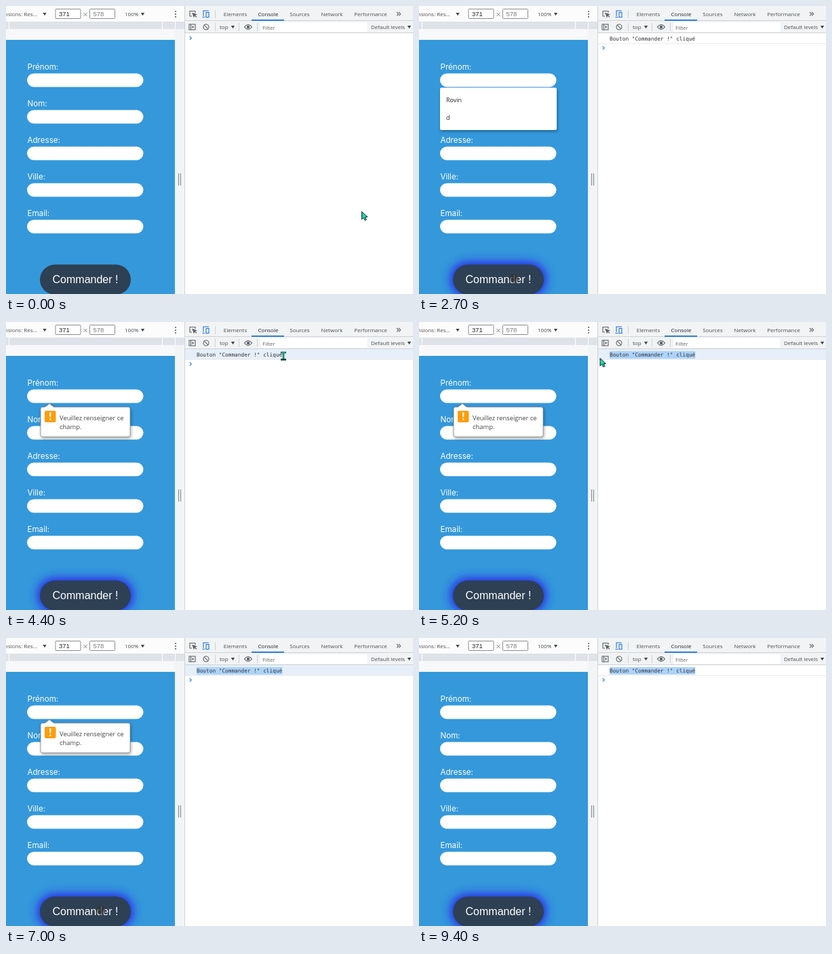
An HTML page that plays this animation: 600 px wide and 425 px high, repeating every 9.5 s.

```html
<!DOCTYPE html>
<html lang="fr">
<head>
<meta charset="utf-8">
<title>Formulaire et console</title>
<style>
html, body { margin: 0; width: 100%; height: 100%; overflow: hidden; background: #fff; }
svg { display: block; width: 600px; height: 425px; }
text { font: 8px "Open Sans", "Noto Sans", sans-serif; fill: #4a4d51; white-space: pre; }
.label text { font: 11.6px Inter, sans-serif; fill: #fff; }
.size { font: 9.5px "Liberation Sans", Arial, sans-serif; fill: #222; }
.order { font: 16px "Liberation Sans", Arial, sans-serif; fill: #fff; }
.log { font: 7.77px "DejaVu Sans Mono", monospace; fill: #303236; }
.items text { font-size: 9px; fill: #222; }
.tip text { font-size: 9.4px; fill: #444; }
.mid { text-anchor: middle; }
.icon { fill: none; stroke: #5f6368; stroke-width: 1.1; }
.shade { filter: drop-shadow(1px 2px 2px rgba(0, 0, 0, .35)); }

.anim { animation: 9.5s step-end infinite; }
#glow { animation-name: glow; }
#items { animation-name: items; }
#tip { animation-name: tip; }
#log { animation-name: log; }
#prompt { animation-name: prompt; }
#row { animation-name: row; }
#marked { animation-name: marked; transform-box: fill-box; transform-origin: right; }
#pointer { animation-name: move; }
#arrow { animation-name: arrow; }
#beam { animation-name: beam; }
#touch { animation-name: touch; }

@keyframes glow {
  0% { opacity: 0; }
  20% { opacity: 0; animation-timing-function: steps(4); }
  24.21%, 100% { opacity: 1; }
}
@keyframes items { 0%, 45.26%, 100% { opacity: 0; } 21.05% { opacity: 1; } }
@keyframes tip {
  0%, 76.84%, 100% { opacity: 0; }
  21.05% { opacity: 1; }
  73.68% { opacity: 1; animation-timing-function: steps(3); }
}
@keyframes log { 0% { opacity: 0; } 21.05%, 100% { opacity: 1; } }
@keyframes prompt { 0% { transform: none; } 21.05%, 100% { transform: translateY(14.5px); } }
@keyframes row { 0%, 98.94%, 100% { opacity: 0; } 45.26% { opacity: 1; } }
@keyframes marked {
  0% { transform: scaleX(0); }
  46.31% { transform: scaleX(0); animation-timing-function: steps(6); }
  52.63%, 100% { transform: scaleX(1); }
}
@keyframes arrow {
  0%, 32.63%, 53.68% { opacity: 1; }
  8.42%, 34.73%, 61.05%, 100% { opacity: 0; }
}
@keyframes beam { 0%, 53.68%, 100% { opacity: 0; } 34.73% { opacity: 1; } }
@keyframes touch { 0%, 32.63% { opacity: 0; } 8.42%, 61.05%, 100% { opacity: 1; } }
@keyframes move {
  0% { transform: translate(524px, 303px); animation-timing-function: steps(1); }
  1.05% { transform: translate(520px, 304px); animation-timing-function: steps(2); }
  3.15% { transform: translate(480px, 318px); animation-timing-function: steps(3); }
  6.31% { transform: translate(330px, 352px); animation-timing-function: steps(2); }
  8.42% { transform: translate(230px, 378px); animation-timing-function: steps(2); }
  10.52% { transform: translate(170px, 396px); animation-timing-function: steps(3); }
  13.68%, 25.26% { transform: translate(147px, 402px); }
  26.31% { transform: translate(144px, 402px); animation-timing-function: steps(2); }
  28.42% { transform: translate(140px, 402px); }
  29.47% { transform: translate(143px, 398px); animation-timing-function: steps(2); }
  31.57% { transform: translate(190px, 340px); animation-timing-function: steps(2); }
  33.68% { transform: translate(310px, 160px); animation-timing-function: steps(2); }
  35.78% { transform: translate(392px, 68px); animation-timing-function: steps(3); }
  38.94% { transform: translate(394px, 64px); animation-timing-function: steps(6); }
  45.26% { transform: translate(409px, 50px); }
  46.31% { transform: translate(409px, 50px); animation-timing-function: steps(6); }
  52.63% { transform: translate(281px, 50px); animation-timing-function: steps(2); }
  54.73%, 57.89% { transform: translate(266.5px, 53px); }
  58.94% { transform: translate(262px, 62px); animation-timing-function: steps(2); }
  61.05% { transform: translate(240px, 120px); animation-timing-function: steps(4); }
  65.26% { transform: translate(180px, 310px); animation-timing-function: steps(3); }
  68.42% { transform: translate(145px, 398px); animation-timing-function: steps(5); }
  73.68%, 82.1% { transform: translate(140px, 402px); }
  83.15% { transform: translate(139px, 404px); animation-timing-function: steps(6); }
  89.47%, 100% { transform: translate(132px, 440px); }
}
</style>
</head>
<body>
<svg viewBox="0 0 600 425">
  <defs>
    <rect id="field" x="31" y="99.5" width="171.5" height="20" rx="10" fill="#fff"/>
    <path id="down" d="M-2.7-2h5.4L0 2.3z" fill="#45484c"/>
    <radialGradient id="spot">
      <stop offset=".45" stop-color="#303030" stop-opacity=".8"/>
      <stop offset="1" stop-color="#303030" stop-opacity=".4"/>
    </radialGradient>
    <filter id="blur" x="-30%" y="-80%" width="160%" height="260%"><feGaussianBlur stdDeviation="6.5"/></filter>
  </defs>

  <!-- device toolbar and rulers -->
  <rect width="263" height="425" fill="#f3f4f6"/>
  <rect width="263" height="23" fill="#fcfcfd"/>
  <rect y="23" width="263" height="11" fill="#dfe2e8"/>
  <path d="M4.5 23v11M230.500 23v11M249.500 23v11" stroke="#fff"/>
  <rect y="34" width="249" height="16" fill="#f8f8fa"/>
  <text x="46" y="15" text-anchor="end">nsions: Res...</text>
  <use href="#down" x="57" y="12"/>
  <g fill="#fff" stroke="#8a8d91">
    <rect x="73" y="4.500" width="37" height="14" rx="1"/>
    <rect x="123.500" y="4.500" width="37" height="14" rx="1"/>
  </g>
  <text class="size" x="78" y="15">371</text>
  <text class="size" x="128.500" y="15" style="fill:#777">578</text>
  <path d="M114.500 10l5 5m0-5l-5 5" stroke="#777" stroke-width=".9"/>
  <text x="175" y="15">100%</text>
  <use href="#down" x="201.500" y="12"/>
  <g fill="#5f6368"><circle cx="250" cy="8" r="1.100"/><circle cx="250" cy="12" r="1.100"/><circle cx="250" cy="16" r="1.100"/></g>
  <path d="M254.500 247v18M257.500 247v18" stroke="#8f9296" stroke-width="1.200"/>

  <!-- page -->
  <rect y="50" width="249" height="375" fill="#3498db"/>
  <g class="label">
    <text x="31.500" y="94">Prénom:</text>
    <text x="31.500" y="148">Nom:</text>
    <text x="31.500" y="202">Adresse:</text>
    <text x="31.500" y="256">Ville:</text>
    <text x="31.500" y="310">Email:</text>
  </g>
  <use href="#field"/><use href="#field" y="54"/><use href="#field" y="108"/><use href="#field" y="162"/><use href="#field" y="216"/>
  <rect id="glow" class="anim" x="46" y="377.500" width="142" height="52" rx="26" fill="#2b2bea" filter="url(#blur)"/>
  <rect x="50" y="381.500" width="134" height="44.500" rx="22.250" fill="#2e4053"/>
  <text class="order mid" x="117" y="409">Commander !</text>

  <g id="tip" class="anim tip">
    <path class="shade" d="M54 125.500h3.500l6.500-5 6.500 5H180q3 0 3 3v38q0 3-3 3H54q-3 0-3-3v-38q0-3 3-3z" fill="#fff" stroke="#858585" stroke-width=".8"/>
    <rect x="57" y="131" width="16.500" height="17" rx="2" fill="#ff9d0b"/>
    <path d="M64 133.500h2.600l-.5 7h-1.600zM64.200 142.500h2.200v2.300h-2.200z" fill="#fff"/>
    <text x="79" y="144.500">Veuillez renseigner ce</text>
    <text x="79" y="157.500">champ.</text>
  </g>
  <g id="items" class="anim items">
    <rect class="shade" x="31" y="120.500" width="172" height="62.500" rx="2" fill="#fff"/>
    <text x="40" y="142">Rovin</text>
    <text x="40" y="167.500">d</text>
  </g>

  <!-- developer tools -->
  <rect x="263" width="337" height="425" fill="#fff"/>
  <rect x="264" width="336" height="39" fill="#f1f3f4"/>
  <path d="M263.500 0v425M264 21.500h336M264 39.500h336" stroke="#cfd2d6"/>
  <path d="M308.500 6v12M308.500 25v12M343.500 25v12M370.500 25v12" stroke="#cfd2d6"/>
  <rect x="362" y="20" width="48" height="1.800" fill="#1a73e8"/>
  <g class="icon">
    <path d="M279 10V7.500h-8V15h3"/>
    <path d="M275 10.500l5.500 2-2.500 1-1 2.500zM278 13.500l3 3" fill="#5f6368"/>
    <path d="M291 15V7h8M289.500 16.500h4" stroke="#1a73e8"/>
    <rect x="295" y="9.500" width="4" height="7" stroke="#1a73e8"/>
    <rect x="270" y="27" width="9" height="8"/>
    <path d="M272.500 27v8"/>
    <path d="M274.500 29l3 2-3 2z" fill="#5f6368" stroke="none"/>
    <circle cx="295" cy="31" r="4"/>
    <path d="M292.200 28.200l5.600 5.600"/>
    <path d="M351.500 31q5.500-7 11 0-5.500 7-11 0z"/>
    <circle cx="357" cy="31" r="1.700" fill="#5f6368"/>
  </g>
  <g class="mid">
    <text x="338" y="15">Elements</text>
    <text x="386.500" y="15" style="fill:#222">Console</text>
    <text x="433" y="15">Sources</text>
    <text x="480.500" y="15">Network</text>
    <text x="537.500" y="15">Performance</text>
  </g>
  <path class="icon" d="M576 9l2.700 2.700-2.700 2.700M579 9l2.700 2.700-2.700 2.700" stroke-width=".9"/>
  <text x="315" y="34">top</text>
  <use href="#down" x="334.500" y="31"/>
  <rect x="375" y="24" width="157.500" height="14" fill="#fff"/>
  <text x="378" y="34.500" style="fill:#666">Filter</text>
  <text x="538" y="34">Default levels</text>
  <use href="#down" x="594.500" y="31"/>

  <rect id="row" class="anim" x="264" y="40" width="336" height="15" fill="#e6eff9"/>
  <rect id="marked" class="anim" x="281" y="43" width="126.300" height="11" fill="#add3f8"/>
  <g id="log" class="anim">
    <path d="M264 55.500h336" stroke="#ececee"/>
    <text class="log" x="281" y="51">Bouton "Commander !" cliqué</text>
  </g>
  <path id="prompt" class="anim" d="M270.700 45l2.700 2.400-2.700 2.400" fill="none" stroke="#367cf1" stroke-width="1.200"/>

  <g id="pointer" class="anim">
    <path id="arrow" class="anim" d="M.5.500v11.200l2.700-2.300 2 4 2.200-1-1.900-3.800 3.400-.3z" fill="#18dfb0" stroke="#14211f"/>
    <g id="beam" class="anim">
      <path d="M-4-5h8M0-5V5M-4 5.500h8" fill="none" stroke="#123b38" stroke-width="2.600"/>
      <path d="M-3.500-5.200h7M0-5V4" fill="none" stroke="#14ad91" stroke-width="1.600"/>
    </g>
    <circle id="touch" class="anim" r="7" fill="url(#spot)"/>
  </g>
</svg>
</body>
</html>
```
